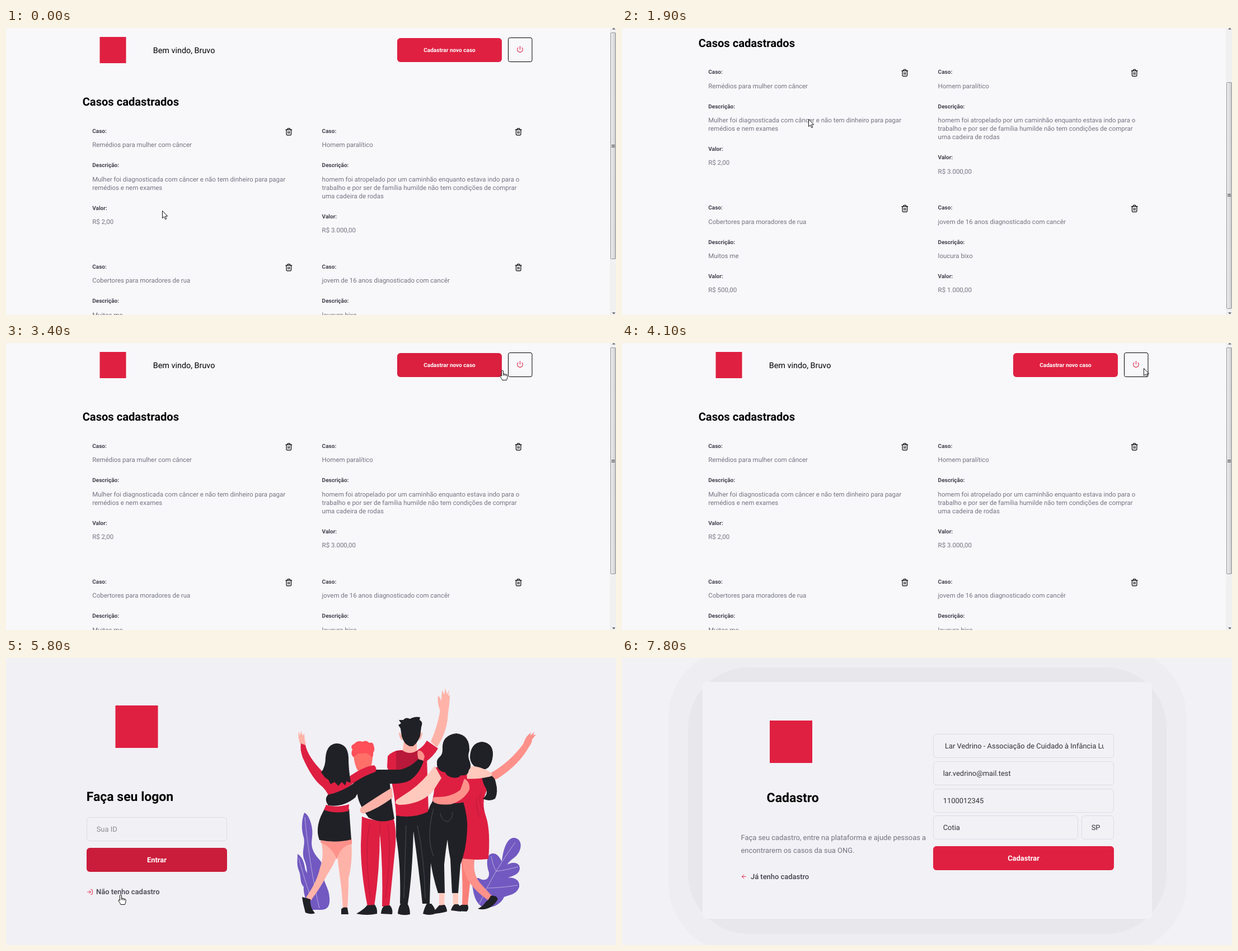
An HTML page with a canvas for the animation above (8 s loop, 1090x514 px).

```html
<!DOCTYPE html>
<html lang="pt-BR">
<head>
<meta charset="utf-8">
<title>Casos cadastrados</title>
<style>
html, body { margin: 0; width: 100%; height: 100%; overflow: hidden; background: #f1f0f5; }
canvas { display: block; }
</style>
</head>
<body>
<canvas id="stage" width="1090" height="514"></canvas>
<script>
const ctx = document.getElementById('stage').getContext('2d');
const LOOP = 8000, STEP = 100, MAX_SCROLL = 105.5;
const RED = '#e02041', INK = '#41414d', GREY = '#737380', LINE = '#dcdce6', HINT = '#8c8c94';
// Font sizes of the page at its zoom level
const SMALL = 10.05, BODY = 11.49, LEAD = 14.36, FIELD = 12.92, HEAD = 20.1, TITLE = 22.97;

// [start, steps, x, y, pointer]: each step lasts 100 ms
const moves = [
  [0, 1, 279, 327], [100, 1, 178, 286], [300, 2, 33, 120], [500, 3, 553, 57], [800, 2, 318, 125],
  [1700, 3, 333, 163], [2000, 3, 362, 208], [2300, 2, 381, 223], [2900, 2, 778, 128],
  [3200, 1, 823, 91], [3300, 1, 868, 55, 'hand'], [3400, 1, 887, 49, 'hand'], [3500, 3, 932, 45, 'hand'],
  [4100, 1, 932, 45], [4700, 3, 330, 330], [5000, 1, 175, 428, 'hand'], [5200, 2, 205, 418, 'hand'],
  [5500, 1, 214, 372, 'hand'], [5600, 2, 209, 380, 'hand'], [5800, 1, 205, 424, 'hand'],
  [6500, 1, 222, 382], [6800, 2, 505, 240], [7200, 1, 545, 205], [7300, 2, 622, 158, 'beam'],
  [7800, 1, 622, 158, 'none']
];
const scrolls = [[0, 0], [1400, 7], [1500, 38], [1600, 71], [1700, 94], [1800, MAX_SCROLL], [2600, 42], [2700, 0]];
const newHover = [[0, 0], [3300, .5], [3400, .25], [3500, 0]];
const loginHover = [[0, 0], [5500, .5], [5600, 1], [6100, 0]];

const held = (track, t) => track.filter(k => k[0] <= t).pop()[1];

function pointerAt(t) {
  let x = 0, y = 0, kind;
  for (const [start, steps, toX, toY, shape] of moves) {
    if (t < start) break;
    const k = Math.min(steps, Math.floor((t - start) / STEP) + 1) / steps;
    x += (toX - x) * k;
    y += (toY - y) * k;
    kind = shape || 'arrow';
  }
  return { x, y, kind };
}

function text(str, x, mid, size, color, weight = 400, align = 'left') {
  ctx.font = `${weight} ${size}px Roboto, sans-serif`;
  ctx.textAlign = align;
  ctx.fillStyle = color;
  ctx.fillText(str, x, Math.round(mid + size * .35));
}

function box(x, y, w, h, r, fill, stroke) {
  ctx.beginPath();
  ctx.roundRect(x, y, w, h, r);
  if (fill) { ctx.fillStyle = fill; ctx.fill(); }
  if (stroke) { ctx.strokeStyle = stroke; ctx.lineWidth = 1; ctx.stroke(); }
}

function button(x, y, w, h, label, size, hover = 0) {
  const [r, g, b] = [224, 32, 65].map(c => Math.round(c * (1 - hover * .1)));
  box(x, Math.round(y), w, h, 5.7, `rgb(${r},${g},${b})`);
  text(label, x + w / 2, y + h / 2, size, '#fff', 700, 'center');
}

function field(x, y, w, str, color, lead = 17.7) {
  box(x + .5, y + .5, w - 1, 42, 5.5, null, LINE);
  ctx.save();
  ctx.beginPath();
  ctx.rect(x + 17, y, w - 35, 43);
  ctx.clip();
  text(str, x + lead, y + 21.7, FIELD, color);
  ctx.restore();
}

const icons = {
  trash: new Path2D('M3 6h18M19 6v14a2 2 0 0 1-2 2H7a2 2 0 0 1-2-2V6m3 0V4a2 2 0 0 1 2-2h4a2 2 0 0 1 2 2v2M10 11v6M14 11v6'),
  power: new Path2D('M18.36 6.64a9 9 0 1 1-12.73 0M12 2v10'),
  enter: new Path2D('M15 3h4a2 2 0 0 1 2 2v14a2 2 0 0 1-2 2h-4M10 17l5-5-5-5M15 12H3'),
  back: new Path2D('M19 12H5M12 19l-7-7 7-7')
};

function icon(name, cx, cy, size, color) {
  ctx.save();
  ctx.translate(cx - size / 2, cy - size / 2);
  ctx.scale(size / 24, size / 24);
  ctx.lineWidth = 2;
  ctx.lineCap = ctx.lineJoin = 'round';
  ctx.strokeStyle = color;
  ctx.stroke(icons[name]);
  ctx.restore();
}

const pointers = {
  arrow: new Path2D('M.5.5V13.6L3.6 10.8L5.7 15.6L7.8 14.7L5.7 10H9.7Z'),
  hand: new Path2D('M-1.5 1Q0-.8 1.5 1V6.5Q3 5.5 4 7Q5.5 6 6.5 7.5Q8.5 7 9 9V12.5Q8.6 15 7.4 17.5H0Q-1 15-4 11Q-4.5 9-2.5 9.3L-1.5 10.5ZM1.5 6.5V9.5M4 7V9.8M6.5 7.5V10'),
  beam: new Path2D('M-3-6.5H-.5L0-6L.5-6.5H3M0-6V6M-3 6.5H-.5L0 6L.5 6.5H3')
};

function pointer({ x, y, kind }) {
  if (kind === 'none') return;
  ctx.save();
  ctx.translate(Math.round(x), Math.round(y));
  ctx.fillStyle = '#fff';
  ctx.strokeStyle = '#111';
  ctx.lineWidth = 1;
  if (kind !== 'beam') ctx.fill(pointers[kind]);
  ctx.stroke(pointers[kind]);
  ctx.restore();
}

const cases = [
  [137, 184.3, 'Remédios para mulher com câncer', ['Mulher foi diagnosticada com câncer e não tem dinheiro para pagar', 'remédios e nem exames'], 'R$ 2,00'],
  [547.4, 184.3, 'Homem paralítico', ['homem foi atropelado por um caminhão enquanto estava indo para o', 'trabalho e por ser de família humilde não tem condições de comprar', 'uma cadeira de rodas'], 'R$ 3.000,00'],
  [137, 427.3, 'Cobertores para moradores de rua', ['Muitos me'], 'R$ 500,00'],
  [547.4, 427.3, 'jovem de 16 anos diagnosticado com cancêr', ['loucura bixo'], 'R$ 1.000,00']
];

function caseCard([left, top, name, about, value], scroll) {
  const x = left + 17.2;
  let y = top - scroll;
  icon('trash', left + 368.3, y + 1.5, 14.4, '#000');
  for (const [label, lines] of [['Caso:', [name]], ['Descrição:', about], ['Valor:', [value]]]) {
    text(label, x, y, SMALL, INK, 700);
    y += 24.9;
    lines.forEach((line, i) => text(line, x, y + i * 15.1, BODY, GREY));
    y += (lines.length - 1) * 15.1 + 36.4;
  }
}

function scrollbar(scroll) {
  const top = 8 + scroll * .843, mid = top + 202.5;
  ctx.fillStyle = '#f0f0f1';
  ctx.fillRect(1079, 0, 11, 514);
  const shade = ctx.createLinearGradient(1080, 0, 1090, 0);
  shade.addColorStop(0, '#f4f4f4');
  shade.addColorStop(.5, '#dedee0');
  shade.addColorStop(1, '#c6c6ca');
  box(1080.5, Math.round(top) + .5, 9, 405, 1.5, shade, '#97979b');
  ctx.fillStyle = '#55555a';
  for (let i = -1; i < 2; i++) ctx.fillRect(1082, Math.round(mid) + i * 2, 6, 1);
  ctx.fill(new Path2D('M1083 2.5L1086 0L1089 2.5ZM1083 509.5H1089L1086 512.5Z'));
}

function dashboard(t) {
  const s = held(scrolls, t);
  ctx.fillStyle = '#f8f8fb';
  ctx.fillRect(0, 0, 1090, 514);
  ctx.fillStyle = RED;
  ctx.fillRect(167.5, 16 - s, 47, 47);
  text('Bem vindo, Bruvo', 262.8, 40 - s, LEAD, '#000');
  button(699, 17.7 - s, 187, 43, 'Cadastrar novo caso', SMALL, held(newHover, t));
  box(897.5, Math.round(18 - s) - .5, 42.5, 43, 3, null, '#000');
  icon('power', 918.5, 38 - s, 12.9, RED);
  text('Casos cadastrados', 136.7, 132.2 - s, HEAD, '#000', 700);
  cases.forEach(c => caseCard(c, s));
  scrollbar(s);
}

// Group of friends seen from behind, back to front
const DARK = '#202126', CLOTH = '#de1f42', SHADE = '#b8183a', SKIN = '#ffb3a8',
      PALE = '#ffc9bd', ROSE = '#ff918b', LEAF = '#7159c1';
const art = [
  [LEAF, 'M533 277C540 280 545 292 547 306C549 322 543 330 549 345C556 362 567 360 566 382C565 400 578 412 578 430C579 444 575 451 562 451H545C536 440 543 420 540 404C536 388 540 380 534 364C526 345 537 335 531 318C527 302 529 288 533 277Z'],
  [LEAF, 'M521 351C532 358 533 370 535 380C541 390 544 400 546 412L560 450H540C536 430 531 422 532 410C524 402 528 390 523 380C519 370 521 360 521 351Z'],
  [LEAF, 'M834 412C830 398 840 390 848 396C858 400 864 394 863 384C858 370 858 350 870 350C880 350 884 362 886 364C888 346 894 322 908 322C924 324 922 344 912 354C906 360 898 364 896 370C906 364 919 366 918 378C916 388 906 390 896 394C908 392 919 398 917 410C912 424 900 424 890 428C884 442 868 449 852 446C840 440 836 426 834 412Z'],
  ['#b9acdf', 'M534 285C538 330 548 400 560 448M523 358C530 385 538 410 545 430M910 330Q870 385 846 440M867 355Q870 372 876 382M915 374Q892 380 876 382M914 407Q880 412 860 412', 1],
  // woman in a dress
  ['#fa7f78', 'M813 356H834Q834 385 829 405L825 443H815Q817 405 813 356Z'],
  [ROSE, 'M815 358H838Q832 385 848 404L870 428L862 434Q836 416 826 398Q816 380 815 358Z'],
  [DARK, 'M843 449Q852 445 858 436Q862 434 866 426Q876 424 879 432Q872 444 862 448Q852 452 843 449ZM803 453Q806 446 814 442H825Q828 450 823 454Z'],
  [ROSE, 'M866 206Q900 187 925 153L935 158Q918 190 880 215Q868 222 862 216Z'],
  [ROSE, 'M924 155Q928 142 933 138L938 133L937 139L944 132L942 138L947 137L940 146Q940 152 934 160Z'],
  [CLOTH, 'M808 216Q840 208 858 214Q866 222 856 245Q850 262 858 285Q866 310 862 360Q835 363 808 358Q824 320 822 290Q806 260 808 216Z'],
  [SHADE, 'M850 240Q842 252 852 272M842 250Q838 262 846 285', 1],
  [DARK, 'M829 178Q830 152 850 150Q871 152 870 174Q869 188 862 196Q852 204 840 196Q830 190 829 178Z'],
  [DARK, 'M850 210Q872 206 875 222Q880 240 874 252Q864 258 852 252Q862 244 858 234Q852 226 850 210Z'],
  // tall man
  [SKIN, 'M759 150Q772 120 776 92L790 95Q790 130 770 160Z'],
  [SKIN, 'M776 95Q770 80 772 67L776 72L778 77Q778 62 780 58L783 66L785 54L788 65L792 57L790 68L793 66Q793 80 790 98Z'],
  [DARK, 'M697 280Q728 288 755 273L760 330L757 440H744Q738 380 728 310Q726 390 718 440H704Q706 370 697 320Z'],
  [DARK, 'M700 458Q701 446 706 439H717Q722 448 722 459Q710 462 700 458ZM745 458Q748 446 752 440H760Q768 448 767 458Q756 462 745 458Z'],
  [CLOTH, 'M682 176Q690 166 705 165L738 166L752 178L755 275Q728 288 697 282Q694 230 681 195Z'],
  [CLOTH, 'M735 165Q745 160 752 148L772 162Q764 176 750 186Z'],
  [SHADE, 'M697 166H740L745 190L720 199L697 201Z'],
  [SKIN, 'M711 148H734V166Q722 174 709 166ZM702 134Q705 130 709 148Q703 146 702 134ZM744 134Q740 130 737 148Q743 146 744 134Z'],
  [DARK, 'M707 140L705 126L701 120L706 117L702 111L710 111Q714 105 722 109Q730 104 740 106L739 111Q746 114 742 124L740 140Q734 154 727 158H721Q711 154 707 140Z'],
  // young man with curls
  [CLOTH, 'M636 284Q665 296 692 286Q699 308 695 345Q690 395 685 445H672Q674 380 668 312Q668 380 658 445H646Q634 385 634 335Z'],
  [SHADE, 'M650 298Q640 340 651 430M682 298Q690 340 678 430M668 295V320', 1],
  [DARK, 'M626 458Q640 450 645 443L659 442Q664 448 663 458Q645 462 626 458ZM670 458Q671 447 676 444L686 443Q692 450 690 459Z'],
  ['#ff7069', 'M621 172Q622 158 638 158Q655 160 655 178Q654 194 648 204H630Q622 192 621 172Z'],
  ['#ff4f58', 'M621 178Q615 172 619 164Q614 157 622 154Q628 147 637 150Q644 146 649 152Q656 150 657 157Q660 164 656 170Q657 175 654 178Q645 168 638 171Q628 169 621 178Z'],
  [DARK, 'M617 218Q632 206 655 200L705 200Q722 196 737 181L746 184Q740 206 722 219Q710 226 686 225Q688 255 694 288Q672 298 648 286Q630 262 628 245Q624 225 617 218Z'],
  [ROSE, 'M737 181Q734 172 736 166Q744 164 748 176L746 184Z'],
  [SKIN, 'M690 232Q660 250 634 268Q630 276 638 279Q665 270 691 250Z'],
  // woman in a skirt
  [SKIN, 'M562 327Q570 350 561 376Q556 400 536 429L545 434Q564 408 574 388Q592 362 600 327Z'],
  [SKIN, 'M590 327H617Q620 365 612 395Q612 420 610 448H602Q600 415 597 395Q592 360 590 327Z'],
  [ROSE, 'M562 327Q590 332 618 324V333Q598 336 591 361Q584 340 562 330Z'],
  [DARK, 'M529 428L544 432Q542 445 552 457Q545 460 535 456L531 440ZM599 459V450Q602 445 610 447L612 459Z'],
  [SKIN, 'M526 155Q521 142 523 132L526 139L527 130L530 139L533 135Q533 146 536 156Z'],
  [CLOTH, 'M569 210Q590 215 607 224L600 245Q590 255 578 250Q572 235 560 226Q545 212 530 178Q525 164 527 153L535 156Q540 178 566 204Z'],
  [CLOTH, 'M585 235Q630 195 658 192Q664 198 660 204Q625 216 600 242L580 254Z'],
  [DARK, 'M622 224Q600 240 575 245Q568 254 576 264Q602 268 624 250L634 232Z'],
  [DARK, 'M572 266Q590 280 613 270L617 325Q590 332 560 326Q550 300 572 266Z'],
  [CLOTH, 'M572 263Q590 269 613 262L612 274Q590 280 568 272Z'],
  [DARK, 'M571 178Q573 154 591 153Q611 154 612 178Q612 200 616 222Q612 224 609 220L606 228L600 222L594 229L587 222L580 226L576 218L570 214L563 205Q571 195 571 178Z'],
  // woman with wavy hair
  [PALE, 'M774 418H784L783 444H774ZM798 418H808V443H799Z'],
  [DARK, 'M760 458Q768 450 774 443L784 442Q788 448 788 454Q775 458 760 458ZM795 452Q797 444 802 441H808Q814 446 813 454Z'],
  [DARK, 'M763 255Q790 264 816 254Q826 285 824 310Q822 345 812 370L808 421H797L794 360Q790 340 789 325Q786 340 783 370L784 421H772Q762 390 757 355Q748 325 750 295Q752 272 763 255Z'],
  ['#55565e', 'M764 270Q750 320 764 355M776 278Q778 292 790 293Q798 288 798 276M715 300Q713 360 711 430M735 300Q748 360 749 430', .8],
  [PALE, 'M815 194Q845 190 868 206Q870 212 862 213Q840 218 815 216Z'],
  [CLOTH, 'M768 196Q795 188 822 200Q826 220 822 232Q824 248 820 258Q790 264 762 256Q768 225 768 196Z'],
  [PALE, 'M766 193Q745 222 722 238L698 254Q692 262 704 263Q740 262 762 240L778 215Z'],
  [ROSE, 'M819 216Q830 222 828 236Q818 255 795 262Q772 264 764 258Q760 252 766 249Q795 250 812 236Z'],
  [DARK, 'M780 164Q778 138 805 135Q829 138 828 166Q824 176 829 186Q832 196 827 201Q826 212 813 210Q808 216 798 214Q788 213 785 205Q769 202 770 188Q769 182 776 176Q780 172 780 164Z']
].map(([color, d, width]) => ({ color, width, path: new Path2D(d) }));

function drawArt() {
  for (const { color, width, path } of art) {
    ctx.fillStyle = ctx.strokeStyle = color;
    if (width) { ctx.lineWidth = width; ctx.stroke(path); }
    else ctx.fill(path);
  }
}

function login(t) {
  ctx.fillStyle = '#f1f0f5';
  ctx.fillRect(0, 0, 1090, 514);
  ctx.fillStyle = RED;
  ctx.fillRect(195.5, 85, 76, 76);
  text('Faça seu logon', 143.8, 248, TITLE, '#000', 700);
  field(144, 285, 251, 'Sua ID', HINT);
  button(144, 339.6, 251, 43, 'Entrar', FIELD, held(loginHover, t));
  icon('enter', 150, 419, 11.5, RED);
  text('Não tenho cadastro', 161, 418.5, FIELD, INK, 500);
  drawArt();
}

function signup(t) {
  ctx.fillStyle = '#f2f1f6';
  ctx.fillRect(0, 0, 1090, 514);
  box(83, -18, 926, 546, 125, '#eeedf1');
  box(118, 17, 855, 477, 108, '#e8e7eb');
  box(144, 43, 803, 424, 5.7, '#f2f1f6');
  ctx.fillStyle = RED;
  ctx.fillRect(264, 112, 76, 76);
  text('Cadastro', 258.6, 250, TITLE, '#000', 700);
  text('Faça seu cadastro, entre na plataforma e ajude pessoas a', 212.5, 321, FIELD, GREY);
  text('encontrarem os casos da sua ONG.', 212.5, 344, FIELD, GREY);
  icon('back', 217.8, 391.5, 11.5, RED);
  text('Já tenho cadastro', 230, 391, FIELD, INK, 500);

  const filled = t >= 7800, color = filled ? '#333' : HINT;
  const put = (x, y, w, hint, value, lead) => field(x, y, w, filled ? value : hint, color, lead);
  put(556, 136, 323, 'Nome da ONG', 'Lar Vedrino - Associação de Cuidado à Infância Lume', filled ? 21 : undefined);
  put(556, 185, 323, 'E-mail', 'lar.vedrino@mail.test');
  put(556, 234, 323, 'Telefone', '1100012345');
  put(556, 282, 259, 'Cidade', 'Cotia');
  put(821, 282, 58, 'UF', 'SP');
  button(556, 337, 323, 43, 'Cadastrar', FIELD);
}

const begin = performance.now();
function draw(now) {
  const t = Math.max(0, now - begin) % LOOP;
  const page = t < 4400 ? dashboard : t < 6400 ? login : signup;
  ctx.textRendering = 'geometricPrecision';
  page(t);
  pointer(pointerAt(t));
  requestAnimationFrame(draw);
}
draw(begin);
</script>
</body>
</html>
```
